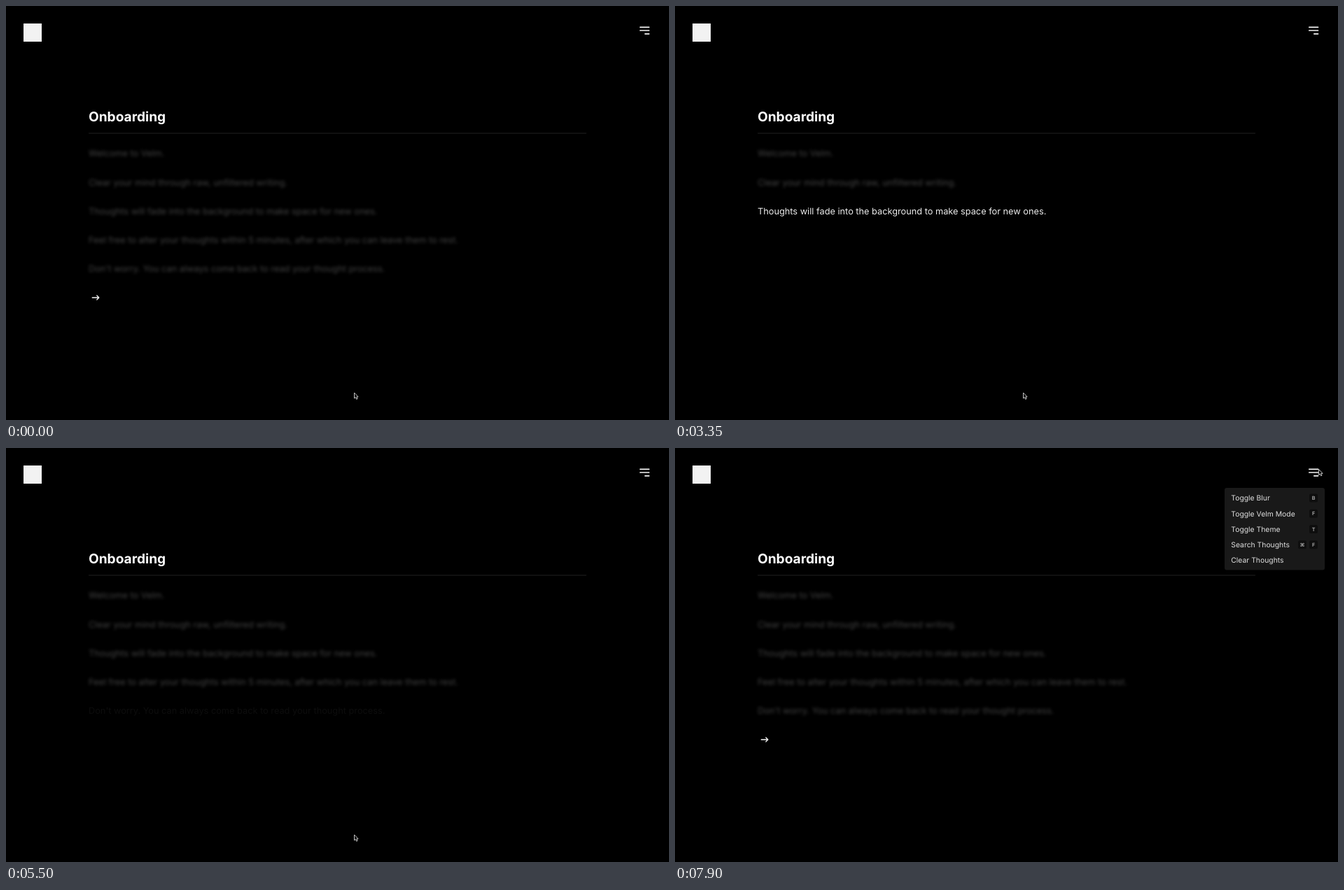
Write an HTML page that moves like this. It is 947x592 px and loops after 8000 ms.

```html
<!DOCTYPE html>
<html lang="en">
<head>
<meta charset="utf-8">
<title>Onboarding</title>
<style>
  html, body { margin: 0; width: 100%; height: 100%; overflow: hidden; background: #000; }
  svg { display: block; width: 100vw; height: 100vh; font-family: Inter, sans-serif; text-rendering: geometricPrecision; }
  .line { font-size: 12.75px; fill: #ececec; }
  .title { font-size: 19.13px; font-weight: 700; fill: #fff; }
  .item { font-size: 10.36px; fill: #dedede; }
  .key { font-size: 7.2px; font-weight: 600; fill: #b4b4b4; text-anchor: middle; }
  .stroke { fill: none; stroke: #f4f4f4; stroke-linecap: round; stroke-linejoin: round; }
</style>
</head>
<body>
<svg id="stage" viewBox="0 0 947 592">
  <rect width="947" height="592"/>
  <rect x="25" y="25" width="26" height="26" fill="#f2f2f2"/>
  <path class="stroke" stroke-width="1.7" d="M905.8 30.3H918.5M905.8 35H918.5M912.8 39.8H918.5"/>
  <g id="head">
    <text class="title" x="118" y="164.5">Onboarding</text>
    <rect x="118" y="181.5" width="711" height="1" fill="#212121"/>
  </g>
  <g id="lines"></g>
  <path id="arrow" class="stroke" stroke-width="1.3" d="M123.2 417H132.8M129.8 414L132.8 417L129.8 420"/>
  <g id="menu">
    <rect x="785" y="57" width="143" height="117.5" rx="3" fill="#191919"/>
  </g>
  <path id="cursor" fill="#000" stroke="#d8d8d8" stroke-width=".9" stroke-linejoin="round"
    d="M0 0V8L1.8 6.5L3.1 9.3L4.5 8.7L3.3 5.9H5.6Z"/>
</svg>
<script>
const LOOP = 8000;
const DIM = 0.28, BLUR = 2.2;
const $ = id => document.getElementById(id);

// Each line: text, start and end of its entrance, start and end of its blur.
const script = [
  ['Welcome to Velm.', 650, 1100, 1530, 1950],
  ['Clear your mind through raw, unfiltered writing.', 1900, 2300, 2980, 3400],
  ['Thoughts will fade into the background to make space for new ones.', 2580, 2950, 3830, 4250],
  ['Feel free to alter your thoughts within 5 minutes, after which you can leave them to rest.', 3990, 4300, 5080, 5500],
  ["Don't worry. You can always come back to read your thought process.", 5480, 5900, 6330, 6750]
];
const RESET = 680;

const items = [
  ['Toggle Blur', 'B'],
  ['Toggle Velm Mode', 'F'],
  ['Toggle Theme', 'T'],
  ['Search Thoughts', '⌘F'],
  ['Clear Thoughts', '']
];

function add(parent, tag, attrs, text = '') {
  const node = document.createElementNS('http://www.w3.org/2000/svg', tag);
  for (const name in attrs) node.setAttribute(name, attrs[name]);
  node.textContent = text;
  parent.appendChild(node);
  return node;
}

const lines = script.map(([text], i) =>
  add($('lines'), 'text', { class: 'line', x: 118, y: 215.3 + i * 41.25 }, text));

items.forEach(([label, keys], i) => {
  const y = 71.6 + i * 22.2;
  add($('menu'), 'text', { class: 'item', x: 794.3, y: y + 3.8 }, label);
  [...keys].reverse().forEach((key, k) => {
    const x = 912 - k * 16;
    add($('menu'), 'rect', { x: x - 6, y: y - 6, width: 12, height: 12, rx: 2.5, fill: '#0e0e0e' });
    add($('menu'), 'text', { class: 'key', x, y: y + 2.6 }, key);
  });
});

const ramp = (t, from, to) => Math.min(1, Math.max(0, (t - from) / (to - from)));
const easeOut = p => 1 - (1 - p) ** 2;
const smooth = p => p * p * (3 - 2 * p);
const mix = (a, b, p) => a + (b - a) * p;

function drawLine(node, t, [, inFrom, inTo, outFrom, outTo]) {
  const before = t < RESET;
  const shown = before ? 1 : ramp(t, inFrom, inTo);
  const gone = before ? 1 : ramp(t, outFrom, outTo);
  node.style.opacity = shown * mix(1, DIM, easeOut(gone));
  node.style.filter = gone ? `blur(${BLUR * gone}px)` : 'none';
}

function draw(t) {
  const before = t < RESET;
  $('head').style.opacity = before ? 1 : ramp(t, 650, 1100);
  lines.forEach((node, i) => drawLine(node, t, script[i]));
  $('arrow').style.opacity = before ? 1 : ramp(t, 6730, 7150);
  $('menu').style.opacity = easeOut(ramp(t, 7660, 7880));

  const p = smooth(ramp(t, 7020, 7550));
  const x = mix(497.5, 919.5, p);
  const y = mix(553, 30.5, p);
  $('cursor').setAttribute('transform', `translate(${x} ${y})`);
}

function tick(now) {
  draw(now % LOOP);
  requestAnimationFrame(tick);
}
draw(0);
requestAnimationFrame(tick);
</script>
</body>
</html>
```
